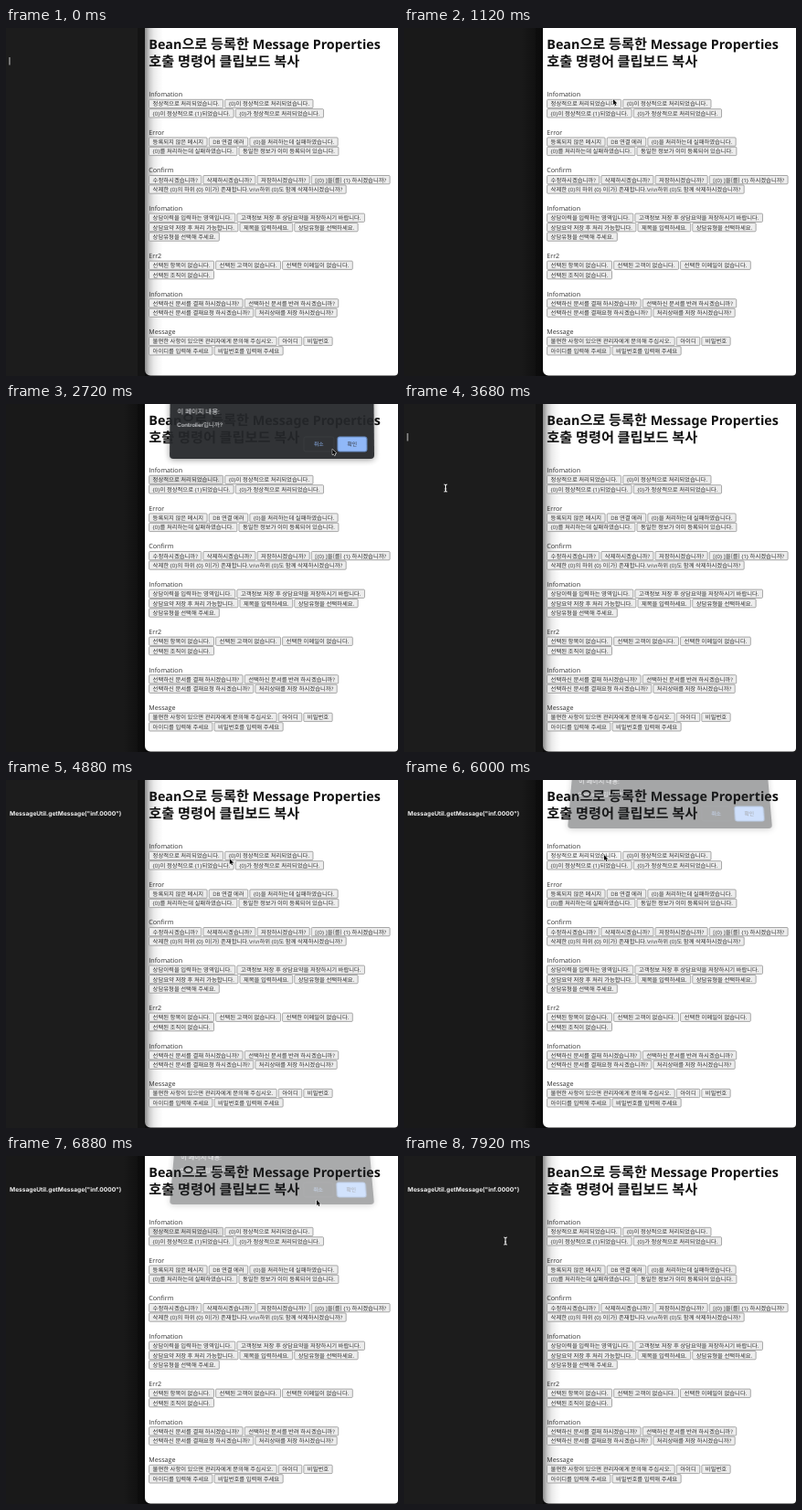
An HTML page with a canvas for the animation above (8000 ms loop, 429 px wide and 381 px high).

```html
<!DOCTYPE html>
<html lang="ko">
<head>
<meta charset="utf-8">
<style>
  html, body { margin: 0; height: 100%; overflow: hidden; background: #1c1c1c; }
  canvas { display: block; }
</style>
</head>
<body>
<canvas id="stage" width="429" height="381"></canvas>
<script>
const LOOP = 8000, W = 429, H = 381, EDGE = 152, SHEET_H = 72;
const LINE = 10.4, BASE = 7.15, BUTTON = 5.96;

const stage = document.getElementById('stage');
const sheet = document.createElement('canvas');
sheet.width = W;
sheet.height = SHEET_H;
let ctx; // the canvas being drawn on

const sections = [
  ['Infomation',
    ['정상적으로 처리되었습니다.', '{0}이 정상적으로 처리되었습니다.'],
    ['{0}이 정상적으로 {1}되었습니다.', '{0}가 정상적으로 처리되었습니다.']],
  ['Error',
    ['등록되지 않은 메시지', 'DB 연결 에러', '{0}을 처리하는데 실패하였습니다.'],
    ['{0}를 처리하는데 실패하였습니다.', '동일한 정보가 이미 등록되어 있습니다.']],
  ['Confirm',
    ['수정하시겠습니까?', '삭제하시겠습니까?', '저장하시겠습니까?', '[{0} ]을(를) {1} 하시겠습니까?'],
    ['삭제한 {0}의 하위 {0} 이(가) 존재합니다.\\n\\n하위 {0}도 함께 삭제하시겠습니까?']],
  ['Infomation',
    ['상담이력을 입력하는 영역입니다.', '고객정보 저장 후 상담요약을 저장하시기 바랍니다.'],
    ['상담요약 저장 후 처리 가능합니다.', '제목을 입력하세요.', '상담유형을 선택하세요.'],
    ['상담유형을 선택해 주세요.']],
  ['Err2',
    ['선택된 항목이 없습니다.', '선택된 고객이 없습니다.', '선택한 이메일이 없습니다.'],
    ['선택된 조직이 없습니다.']],
  ['Infomation',
    ['선택하신 문서를 결재 하시겠습니까?', '선택하신 문서를 반려 하시겠습니까?'],
    ['선택하신 문서를 결재요청 하시겠습니까?', '처리상태를 저장 하시겠습니까?']],
  ['Message',
    ['불편한 사항이 있으면 관리자에게 문의해 주십시오.', '아이디', '비밀번호'],
    ['아이디를 입력해 주세요', '비밀번호를 입력해 주세요']],
];

// Pointer path: time, x, y
const path = [
  [400, 108, 93], [960, 240, 85], [1120, 229, 78], [1700, 229, 78], [2480, 376, 47],
  [2640, 376, 47], [3200, 45.5, 92], [4080, 45.5, 92], [4640, 249, 88], [4960, 244, 86],
  [5600, 219, 82], [6080, 219, 82], [6560, 376, 47], [6720, 376, 47], [6880, 340, 48],
  [7440, 111, 93],
];
const dialogs = [[1640, 2712], [5960, 6790]];

const within = (t, ...spans) => spans.some(([a, b]) => t >= a && t < b);
const clamp = v => Math.min(1, Math.max(0, v));
const smooth = v => v * v * (3 - 2 * v);

// Hangul and Latin runs use different families; returns the width.
function write(text, x, y, size, { weight = 400, latin = 'Open Sans', color = '#303030', dry = false } = {}) {
  const start = x;
  ctx.fillStyle = color;
  for (const run of text.match(/[가-힣()]+|[^가-힣()]+/g)) {
    ctx.font = /[가-힣]/.test(run)
      ? `${weight} ${size * 1.063}px "Noto Sans CJK KR", "Noto Sans CJK JP", sans-serif`
      : `${weight} ${size}px "${latin}", sans-serif`;
    if (!dry) ctx.fillText(run, x, y);
    x += ctx.measureText(run).width;
  }
  return x - start;
}

function box(x, y, w, h, r, fill, stroke, lineWidth = 0.8) {
  ctx.beginPath();
  ctx.roundRect(x, y, w, h, r);
  ctx.fillStyle = fill;
  ctx.fill();
  if (stroke) {
    ctx.strokeStyle = stroke;
    ctx.lineWidth = lineWidth;
    ctx.stroke();
  }
}

// Horizontal shade with evenly spaced black opacities
function shade(x0, x1, ...alphas) {
  const g = ctx.createLinearGradient(x0, 0, x1, 0);
  alphas.forEach((a, i) => g.addColorStop(i / (alphas.length - 1), `rgba(0,0,0,${a})`));
  ctx.fillStyle = g;
  ctx.fillRect(x0, 0, x1 - x0, H);
}

function drawEditor(t, pageFocused) {
  ctx.fillStyle = pageFocused ? '#191919' : '#1c1c1c';
  ctx.fillRect(0, 0, W, H);
  ctx.fillStyle = '#141414';
  ctx.fillRect(144, 0, 14, H);
  if (pageFocused) shade(128, 158, 0, 0.6);
  const pasted = t >= 3920;
  if (pasted) write('MessageUtil.getMessage("inf.0000")', 4, 38.8, 6.58, { weight: 700, latin: 'Inter', color: '#f2f2f2' });
  if (within(t, [0, 460], [3680, 4400], [7200, 7920])) {
    ctx.fillStyle = '#ddd';
    ctx.fillRect(pasted ? 127.5 : 3.5, 32, 0.9, 8.5);
  }
}

function firstButtonColor(t) {
  if (within(t, [1520, 2640], [5920, 6800])) return '#f5f5f5';
  return within(t, [1280, 1520], [2640, 2880], [5520, 5920], [6800, 6990]) ? '#dedede' : '#ededed';
}

function drawPage(t, pageFocused) {
  box(EDGE, -10, W - EDGE, H + 9.5, [0, 0, 4, 6], '#fff');
  if (!pageFocused) shade(EDGE, 172, 0.45, 0.2, 0.08, 0.03, 0);
  const title = { weight: 600, latin: 'Noto Sans', color: '#111' };
  write('Bean으로 등록한 Message Properties', 156.3, 22.6, BASE * 2, title);
  write('호출 명령어 클립보드 복사', 156.3, 42, BASE * 2, title);

  let y = 72.5;
  sections.forEach(([label, ...rows], section) => {
    write(label, 156.3, y + 2.7, BASE);
    rows.forEach((row, line) => {
      y += LINE;
      let x = 156.6;
      row.forEach((text, i) => {
        const w = write(text, 0, 0, BUTTON, { dry: true }) + 8;
        const fill = section + line + i ? '#ededed' : firstButtonColor(t);
        box(x, y - 4.6, w, 9.3, 1, fill, '#929292');
        write(text, x + 4, y + 2.4, BUTTON);
        x += w + 2.1;
      });
    });
    y += LINE * 2;
  });
}

function drawSheet() {
  const text = { weight: 500, latin: 'Inter', color: '#e8eaed' };
  ctx.shadowColor = 'rgba(0,0,0,.45)';
  ctx.shadowBlur = 7;
  ctx.shadowOffsetY = 1;
  box(179, -20, 224, 81, 4, '#25272a');
  ctx.shadowColor = 'transparent';
  write('이 페이지 내용:', 187, 12.2, 7, text);
  write('Controller입니까?', 187, 26.4, 6.1, text);
  box(326, 37, 33, 16, 2, '#25272a', '#303336');
  write('취소', 337, 47.3, 5.5, { ...text, color: '#8ab4f8' });
  box(363, 37, 32, 16, 2, '#8ab4f8', '#5f86c0', 1);
  write('확인', 373.5, 47.3, 5.5, { ...text, color: '#202124' });
}

// The dialog fades while it swings back in perspective, narrower towards the top.
function drawDialog(t) {
  const span = dialogs.find(([open, close]) => t > open && t < close + 150);
  if (!span) return;
  const shown = Math.min(clamp((t - span[0]) / 100), 1 - clamp((t - span[1]) / 150));
  const away = 1 - shown, lift = Math.round(13 * away), left = 169, width = 244;
  ctx.globalAlpha = shown;
  for (let y = 0; y < SHEET_H; y++) {
    const inset = 0.16 * away * (61 - y);
    ctx.drawImage(sheet, left, y, width, 1, left + inset, y - lift, width - 2 * inset, 1);
  }
  ctx.globalAlpha = 1;
}

function pointerAt(t) {
  const i = path.findIndex(p => p[0] > t);
  if (i < 0) return path[path.length - 1].slice(1);
  const [t0, x0, y0] = path[i - 1], [t1, x1, y1] = path[i];
  const k = smooth((t - t0) / (t1 - t0));
  return [x0 + (x1 - x0) * k, y0 + (y1 - y0) * k];
}

function drawPointer(t) {
  if (within(t, [0, 400], [3760, 4080])) return;
  const [x, y] = pointerAt(t);
  ctx.save();
  ctx.translate(x, y);
  if (x < EDGE) {
    const beam = new Path2D('M-1.8-4Q0-4 0-3Q0-4 1.8-4M0-3V3M-1.8 4Q0 4 0 3Q0 4 1.8 4M-1 1H1');
    ctx.strokeStyle = '#eee';
    ctx.lineWidth = 1.1;
    ctx.stroke(beam);
  } else {
    const arrow = new Path2D('M0 0V6L1.4 4.8L2.3 7L3.3 6.5L2.4 4.4H4.3Z');
    ctx.strokeStyle = '#fff';
    ctx.lineWidth = 1;
    ctx.stroke(arrow);
    ctx.fillStyle = '#000';
    ctx.fill(arrow);
  }
  ctx.restore();
}

function drawOn(canvas) {
  ctx = canvas.getContext('2d');
  ctx.textRendering = 'geometricPrecision';
}

function draw() {
  const t = performance.now() % LOOP;
  const pageFocused = within(t, [960, 3120], [5120, 7200]);
  drawEditor(t, pageFocused);
  drawPage(t, pageFocused);
  drawDialog(t);
  drawPointer(t);
  requestAnimationFrame(draw);
}

drawOn(sheet);
drawSheet();
drawOn(stage);
draw();
</script>
</body>
</html>
```
